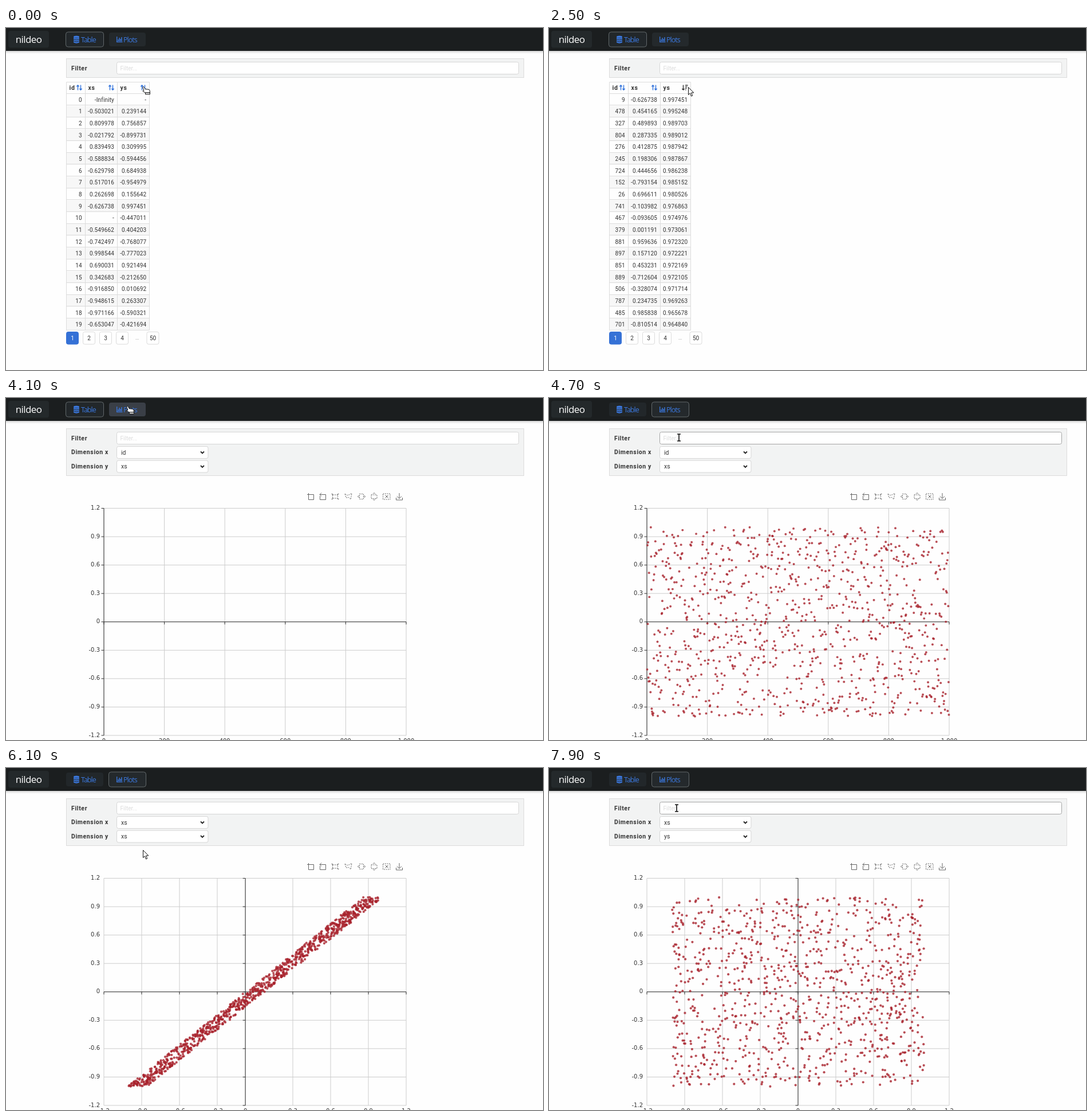
Write an HTML page that moves like this. It is 938 by 597 pixels and loops after 8 s.

```html
<!DOCTYPE html>
<html lang="en">
<head>
<meta charset="utf-8">
<title>Data table and scatter plot</title>
<style>
  html, body { margin: 0; width: 100%; height: 100%; overflow: hidden; background: #fefefe; }
  svg { display: block; width: 938px; height: 597px; }
  text { font: 10px Roboto, sans-serif; fill: #333; white-space: pre; }
  .cell { letter-spacing: .14px; }
  .bold { font-size: 10.5px; font-weight: 600; letter-spacing: .62px; }
  .nav { font: 12.5px "Open Sans", sans-serif; font-stretch: 75%; letter-spacing: -1px; fill: #3b78de; }
  .brand { font-size: 17px; letter-spacing: -.6px; fill: #fff; }
  .axis { font: 10px "DejaVu Sans", sans-serif; }
  .field { font-size: 10.5px; }
  .hint { fill: #dcdcdc; }
  .end { text-anchor: end; }
  .mid { text-anchor: middle; }
</style>
</head>
<body>
<svg viewBox="0 0 938 597" xmlns="http://www.w3.org/2000/svg">
  <defs>
    <linearGradient id="fade" x2="0" y2="1">
      <stop stop-color="#000" stop-opacity=".15"/>
      <stop offset="1" stop-color="#000" stop-opacity="0"/>
    </linearGradient>
    <filter id="drop" x="-20%" y="-30%" width="140%" height="170%">
      <feDropShadow dx="0" dy="2" stdDeviation="4" flood-opacity=".35"/>
    </filter>
  </defs>
  <rect width="938" height="597" fill="#fefefe"/>
  <g id="head"></g>
  <g id="page"></g>
  <g id="chart">
    <g id="grid"></g>
    <g id="dots" fill="#a8222c" fill-opacity=".8"></g>
    <g id="tools"></g>
  </g>
  <g id="form"></g>
  <g id="menu"></g>
  <g id="cursor"></g>
</svg>
<script>
const LOOP = 8000, STEP = 100;
const BLUE = '#3273dc', LINK = '#3b78de';
const el = id => document.getElementById(id);

// ---- drawing helpers
const text = (x, y, s, cls = '', more = '') => `<text x="${x}" y="${y}" class="${cls}" ${more}>${s}</text>`;
const box = (x, y, w, h, fill, stroke = 'none', r = 0, more = '') =>
  `<rect x="${x}" y="${y}" width="${w}" height="${h}" rx="${r}" fill="${fill}" stroke="${stroke}" ${more}/>`;
const path = (d, stroke, more = '') => `<path d="${d}" fill="none" stroke="${stroke}" ${more}/>`;
const at = (x, y, body) => `<g transform="translate(${x} ${y})">${body}</g>`;
const lerp = (a, b, k) => a + (b - a) * k;
const easeOut = (t, start, span) => {
  const p = Math.min(1, Math.max(0, (t - start) / span));
  return 1 - (1 - p) ** 3;
};
const range = n => [...Array(n).keys()];

// Redraw a group only when its markup changes.
const shown = {};
function put(id, html) {
  if (shown[id] !== html) el(id).innerHTML = shown[id] = html;
}

// ---- data: 1000 random rows, with the visible ones fixed
const firstXs = [-Infinity, -.503021, .809978, -.021792, .839493, -.588834, -.629798, .517016, .262698, -.626738,
  NaN, -.549662, -.742497, .998544, .690031, .342683, -.91685, -.948615, -.971166, -.653047];
const firstYs = [NaN, .239144, .756857, -.899731, .309995, -.594456, .684938, -.954979, .155642, .997451,
  -.447011, .404203, -.768077, -.777023, .921494, -.21265, .010692, .263307, -.590321, -.421694];
const topIds = [9, 478, 327, 804, 276, 245, 724, 152, 26, 741, 467, 379, 881, 897, 851, 889, 506, 787, 485, 701];
const topXs = [-.626738, .454165, .489893, .287335, .412875, .198306, .444656, -.793154, .696611, -.103982,
  -.093605, .001191, .959636, .15712, .453231, -.712604, -.328074, .234735, .985838, -.810514];
const topYs = [.997451, .995248, .989703, .989012, .987942, .987867, .986238, .985152, .980526, .976863,
  .974976, .973061, .97232, .972221, .972169, .972105, .971714, .969263, .965678, .96484];

let seed = 20457;
function random() {
  seed = (seed * 1664525 + 1013904223) >>> 0;
  return seed / 4294967296;
}
const rows = range(1000).map(id => ({ id, xs: random() * 2 - 1, ys: random() * 1.9645 - 1 }));
firstXs.forEach((xs, i) => Object.assign(rows[i], { xs, ys: firstYs[i] }));
topIds.forEach((id, i) => Object.assign(rows[id], { xs: topXs[i], ys: topYs[i] }));

const valid = rows.filter(r => !isNaN(r.ys));
const views = {
  none: rows.slice(0, 20),
  asc: [...valid].sort((a, b) => a.ys - b.ys).slice(0, 20),
  desc: [...valid].sort((a, b) => b.ys - a.ys).slice(0, 20)
};

// ---- top bar
function drawHead(hover, active) {
  const button = (x, w, focus, fill) => focus
    ? box(x - .5, 7, w + 1, 26, fill, '#62686a', 4)
    : box(x, 8, w, 24, fill, 'none', 4);
  const disk = y => `<path d="M0 ${y}q5 2.6 10 0v2.2q-5 2.8-10 0z"/>`;
  const db = `<g fill="${LINK}"><ellipse cx="5" cy="1.9" rx="5" ry="1.9"/>${disk(3.2)}${disk(6.4)}${disk(9.6)}</g>`;
  const bars = path('M.7 0V9.3H10.5', LINK, 'stroke-width="1.3"') +
    path('M3 8V5M5 8V2M7 8V4M9 8V1', LINK, 'stroke-width="1.4"');
  put('head',
    box(0, 40, 938, 5, 'url(#fade)') + box(0, 0, 938, 40, '#1b1e1f') +
    box(4, 5, 71, 29.5, '#24292b', 'none', 4) + text(39.5, 26, 'nildeo', 'nav brand mid') +
    button(105, 65, !active, '#22272a') + button(180, 64, active, hover ? '#3a3f47' : '#24292c') +
    at(118, 13.5, db) + text(131, 24.8, 'Table', 'nav') +
    at(193, 15, bars) + text(205, 24.8, 'Plots', 'nav'));
}

// ---- filter panel
function drawForm(s) {
  const select = (y, label, value, focus, hover) =>
    text(114, y + 14.3, label, 'bold') +
    box(193.5, y + .5, 159.5, 21, '#fff', focus ? BLUE : hover ? '#aaa' : '#d6d6d6', 3, `stroke-width="${focus ? 1.5 : 1}"`) +
    (focus ? box(199.5, y + 3.5, 147, 15, 'none', '#444', 0, 'stroke-dasharray="1 1"') : '') +
    text(focus ? 200 : 201, y + 14.5, value, 'field') +
    path(`M340 ${y + 9.5}l3 3 3-3`, '#222', 'stroke-width="1.8"');
  put('form',
    box(105.5, 53.5, 799, s.plots ? 82 : 33, '#f2f3f3', '#dcdcdc') +
    text(114, 73.5, 'Filter', 'bold') +
    box(193.5, 59.5, 702, 21, '#fff', s.inputHover ? '#a4a4a4' : '#d6d6d6', 3) +
    text(199.5, 73.6, 'Filter...', 'hint') +
    (s.plots ? select(84, 'Dimension x', s.dimX, s.openX) +
      select(108.5, 'Dimension y', s.dimY, s.openY, s.hoverY) : ''));
}

// ---- table page
const sortIcon = {
  none: 'M2.5 9.5V.9M.4 3.2L2.5.9 4.6 3.2M7.5.5V9.1M5.4 6.8l2.1 2.3 2.1-2.3',
  asc: 'M2.5.5V9M.4 6.9L2.5 9 4.6 6.9M6 1h1.5M6 3.6h2.5M6 6.2h3.5M6 8.9h4.5',
  desc: 'M2.5.5V9M.4 6.9L2.5 9 4.6 6.9M6 1h4.5M6 3.6h3.5M6 6.2h2.5M6 8.9h1.5'
};
const show = v => isNaN(v) ? '-' : isFinite(v) ? v.toFixed(6) : '-Infinity';

function drawTable(sort, hover) {
  const right = sort === 'desc' ? 247.5 : 250.5, rowH = 20.65;
  const edges = [105.5, 138.5, 194.5, right];
  const icon = (x, kind, color) => at(x, 99, path(sortIcon[kind], color, 'stroke-width="1.4"'));
  let out = '';
  views[sort].forEach((r, i) => {
    const top = 115 + i * rowH, y = top + 13.8;
    if (i % 2) out += box(105.5, top, right - 105.5, rowH, '#f7f7f7');
    out += text(132.7, y, r.id, 'cell end') + text(189, y, show(r.xs), 'cell end') +
      text(right - 5.3, y, show(r.ys), 'cell end');
  });
  let lines = `M105.5 94.5H${right}`;
  range(21).forEach(i => lines += `M105.5 ${Math.floor(115 + i * rowH) - .5}H${right}`);
  edges.forEach(x => lines += `M${x} 94.5V527.5`);
  out += path(lines, '#dcdcdc');
  ['id', 'xs', 'ys'].forEach((name, i) => out += text(edges[i] + 5, 108, name, 'bold'));
  out += icon(123, 'none', BLUE) + icon(179, 'none', BLUE) +
    icon(right - 15.5, sort, sort !== 'none' ? '#333' : hover ? '#1f4f9e' : BLUE);
  [['1', 105], ['2', 134], ['3', 163], ['4', 192], ['50', 245.5]].forEach(([label, x], i) => {
    out += box(x + .5, 530.5, 21, 21.5, i ? '#fff' : '#3571d6', i ? '#dbdbdb' : '#3571d6', 3) +
      text(x + 11, 545.2, label, 'mid', i ? '' : 'style="fill:#fff"');
  });
  return out + text(229, 544, '…', 'mid', 'style="fill:#aaa"');
}

// ---- chart
const L = 171, R = 699, T = 192.5, B = 589, MID = 435;
const mapId = v => L + v * .528;
const mapX = v => MID + v * 220;
const mapY = v => (T + B) / 2 - v * 165.2;
const ticks = range(9).map(i => (i - 4) * .3);
const isZero = v => Math.abs(v) < .01;
const label = v => isZero(v) ? '0' : v.toFixed(1);

function drawGrid(byId, k) {
  const zeroX = lerp(L, MID, k), zeroY = mapY(0);
  const xTicks = byId
    ? range(6).map(i => [mapId(i * 200), (i * 200).toLocaleString('en-US')])
    : ticks.map(v => [isZero(v) ? zeroX : mapX(v), label(v)]);
  let light = '', dark = `M${zeroX} ${T}V${B}M${L} ${zeroY}H${R}`, names = '';
  xTicks.forEach(([x, s]) => {
    light += `M${x} ${T}V${B}`;
    dark += `M${x} ${zeroY}v4.5`;
    names += text(x, 602, s, 'axis mid');
  });
  ticks.forEach(v => {
    const y = mapY(v);
    light += `M${L} ${y}H${R}`;
    dark += `M${zeroX} ${y}h-4.5`;
    names += text(164, y + 2.6, label(v), 'axis end');
  });
  put('grid', path(light, '#ccc') + path(dark, '#333') + names);
}

const points = rows.filter(r => isFinite(r.xs));
el('dots').innerHTML = points.map(() => '<circle/>').join('');
const circles = [...el('dots').children];
let dotKey = '';
function drawDots(grow, kx, ky) {
  const key = [grow, kx, ky].join();
  if (key === dotKey) return;
  dotKey = key;
  points.forEach((p, i) => {
    const c = circles[i];
    c.setAttribute('cx', lerp(mapId(p.id), mapX(p.xs), kx).toFixed(2));
    c.setAttribute('cy', mapY(lerp(p.xs, p.ys, ky)).toFixed(2));
    c.setAttribute('r', (2.1 * grow).toFixed(2));
  });
}

// Toolbox: x, solid strokes, dashed strokes
const tools = [
  [526, 'M0 3.5H11.5V12.5H2.5V6M2.5 1V6', ''],
  [547, 'M4 .5L1 3.5 4 6.5M1 3.5H11.5V12.5H1.5V6', ''],
  [568, 'M.5 2.5h2v2M13.5 2.5h-2v2M.5 11.5h2v-2M13.5 11.5h-2v-2', 'M2.5 4H11.5V10H2.5Z'],
  [591, '', 'M1 2.5L6 5 13 1.5 11 12 8 8.5 3 9Z'],
  [614, 'M2.5 5L.5 7 2.5 9M11.5 5l2 2-2 2', 'M3.5 2.5H10.5V11.5H3.5Z'],
  [636, 'M5 2.5L7 .5 9 2.5M5 11.5l2 2 2-2', 'M2 4H12V10.5H2Z'],
  [658, 'M4.5 4.5l5 5M9.5 4.5l-5 5', 'M.5 2H13V12H.5Z'],
  [681, 'M6 1V10M2 6.5L6 10.5 10 6.5M.5 9V13H11.5V9', '']
];
el('tools').innerHTML = tools.map(([x, solid, dashed]) =>
  at(x, 165, path(solid, '#666') + path(dashed, '#666', 'stroke-dasharray="2 1.5"'))).join('');

// ---- drop-down list
function drawMenu(top, picked, hovered) {
  let out = box(193, top, 158, 74, '#fff', 'none', 2, 'filter="url(#drop)"');
  ['id', 'xs', 'ys'].forEach((name, i) => {
    const y = top + 6.5 + i * 20.5;
    if (i === picked) out += box(193, y, 158, 20, '#122b49');
    else if (i === hovered) out += box(193, y, 158, 20.5, '#f2f2f2');
    out += text(206.3, y + 13.8, name, 'field', i === picked ? 'style="fill:#fff"' : '');
  });
  return out;
}

// ---- pointer: [time, shape, x, y] holds; with x2, y2 it glides until the next key
const track = [
  [0, 'hand', 238, 102], [2000, 'arrow', 243, 103], [2600, 'hand', 228, 103], [2900, 'hand', 229, 103],
  [3100, 'arrow', 232, 103, 226, 80], [3400, 'beam', 225, 70], [3500, 'arrow', 222, 58, 216, 28],
  [3700, 'hand', 210, 14], [4400, 'arrow', 218, 28, 225, 56], [4600, 'beam', 226, 63],
  [4700, 'beam', 227, 69], [4800, 'arrow', 230, 82], [4900, 'arrow', 236, 90],
  [5200, 'arrow', 237, 100, 238, 140], [5400, 'hand', 236, 149], [5600, 'hand', 237, 149],
  [5700, 'hand', 237, 150], [6000, 'arrow', 239, 143], [6200, 'arrow', 239, 141],
  [6400, 'arrow', 240, 122], [6500, 'arrow', 241, 117], [6800, 'arrow', 241, 120, 241, 150],
  [7000, 'hand', 238, 168], [7100, 'hand', 238, 187], [7300, 'arrow', 242, 187],
  [7500, 'arrow', 238, 160, 219, 82], [7700, 'arrow', 219, 82], [7900, 'beam', 223, 70]
];
const ink = 'stroke="#111" stroke-linejoin="round" fill="#fff"';
const shapes = {
  hand: `<path ${ink} d="M1 2C.6.4 2.6-.2 3.4 1.4L5.2 4.7 11 5.2Q13 5.6 13.2 7.6L13.4 11H5.5L1.2 8.6Q.4 6.9 3 7Z"/>` +
    `<path ${ink} d="M5.5 11H13.4V13.8H5.5Z"/>`,
  arrow: `<path ${ink} d="M.5.5V13.6L3.5 10.8 5.5 16 7.7 15.1 5.6 10H9.8Z"/>`,
  beam: path('M-3-6H3M0-6V6M-3 6H3', '#fff', 'stroke-width="3.4"') +
    path('M-3-6H3M0-6V6M-3 6H3', '#111', 'stroke-width="1.6"')
};
function pointer(t) {
  let i = track.length - 1;
  while (track[i][0] > t) i--;
  const [t0, kind, x, y, x2 = x, y2 = y] = track[i];
  const next = i + 1 < track.length ? track[i + 1][0] : LOOP;
  const k = (t - t0) / (next - t0);
  return { kind, x: lerp(x, x2, k), y: lerp(y, y2, k) };
}

// ---- whole picture at time t
function draw(t) {
  const plots = t >= 4000;
  const p = pointer(t);
  const openX = t >= 5100 && t < 6000, openY = t >= 6700 && t < 7300;
  drawHead(t >= 3700 && t < 4400, t >= 4200);
  drawForm({
    plots, openX, openY,
    inputHover: p.kind === 'beam',
    hoverY: t >= 6400 && t < 6700,
    dimX: t < 6000 ? 'id' : 'xs',
    dimY: t < 7300 ? 'xs' : 'ys'
  });
  const sort = t < 1200 ? 'none' : t < 2500 ? 'asc' : t < 3100 ? 'desc' : 'none';
  put('page', plots ? '' : drawTable(sort, t >= 500 && t < 3200));
  el('chart').style.display = plots ? '' : 'none';
  if (plots) {
    const kx = t < 6000 ? 0 : easeOut(t, 5920, 300);
    drawGrid(t < 6000, kx);
    drawDots(easeOut(t, 4100, 1000), kx, t < 7500 ? 0 : easeOut(t, 7420, 300));
  }
  put('menu', openX && t >= 5200 ? drawMenu(109, 0, t >= 5400 ? 1 : -1)
    : openY ? drawMenu(134, 1, t >= 7100 ? 2 : -1) : '');
  put('cursor', at(p.x, p.y, shapes[p.kind]));
}

const start = performance.now();
function tick() {
  const t = (performance.now() - start) % LOOP;
  draw(Math.floor(t / STEP) * STEP);
  requestAnimationFrame(tick);
}
tick();
</script>
</body>
</html>
```
